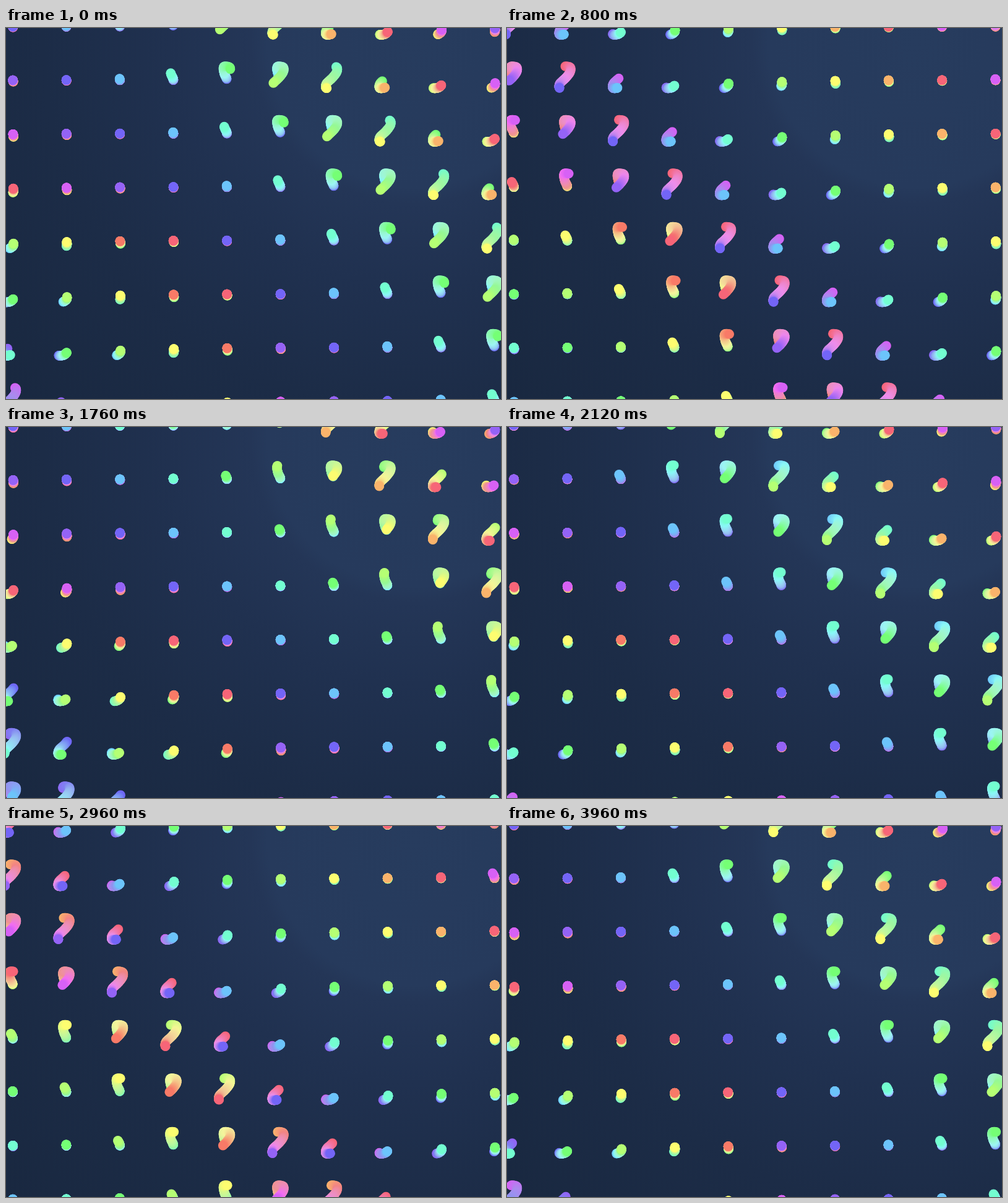
Write an HTML page with a canvas that moves like this. It is 800 px wide and 600 px high and loops after 4 s.

```html
<!DOCTYPE html>
<html lang="en">
<head>
<meta charset="utf-8">
<title>Dot wave</title>
<style>
html, body { margin: 0; width: 100%; height: 100%; overflow: hidden; background: #1a2940; }
canvas { display: block; }
</style>
</head>
<body>
<canvas id="stage" width="800" height="600"></canvas>
<script>
const ctx = document.getElementById('stage').getContext('2d');

const STEP_MS = 40, PERIOD = 50, STAGGER = PERIOD / 12, TRAIL = 9, COPIES = 44;
const COLS = 10, ROWS = 8, GAP = 86.5, LEFT = 11, TOP = -2.5, RADIUS = 7.7;

// Key points of one dot's loop around its rest place: [step, x, y]
const PATH = [
  [0, 0, 0], [5.5, -1, -3.5], [8.3, -4.3, -11], [10.7, -4.8, -21.5],
  [12, 4.5, -20.5], [13, 5, -14], [14.8, -1.5, -4.5], [16.7, -11.5, 5.2],
  [19, -13.2, 11.8], [21.5, -10.5, 13.5], [25, -4, 12.3], [29, .5, 8.6],
  [36, .8, 3.2], [44, .1, .6]
];

const HUES = [246, 203, 160, 120, 92, 60, 30, -8, -72, -100];
const BLOCK_HUES = HUES.map(hue => hue === 30 ? 8 : hue);

const mod = (n, m) => ((n % m) + m) % m;
const mix = (a, b, u) => a + (b - a) * u;

function knot(i) {
  const [step, x, y] = PATH[mod(i, PATH.length)];
  return [step + PERIOD * Math.floor(i / PATH.length), x, y];
}

// Smooth curve through the key points
function place(step) {
  const s = mod(step, PERIOD);
  let i = PATH.length - 1;
  while (PATH[i][0] > s) i--;
  const [a, b, c, d] = [i - 1, i, i + 1, i + 2].map(knot);
  const span = c[0] - b[0], u = (s - b[0]) / span;
  const u2 = u * u, u3 = u2 * u;
  return [1, 2].map(k => {
    const m0 = (c[k] - a[k]) / (c[0] - a[0]) * span;
    const m1 = (d[k] - b[k]) / (d[0] - b[0]) * span;
    return (2 * u3 - 3 * u2 + 1) * b[k] + (u3 - 2 * u2 + u) * m0
         + (3 * u2 - 2 * u3) * c[k] + (u3 - u2) * m1;
  });
}

// Colours from three hues back up to the head, paler half way
function ramp(hues, index) {
  const hueAt = i => hues[mod(i, hues.length)] - 360 * Math.floor(i / hues.length);
  return Array.from({ length: COPIES }, (_, i) => {
    const u = i / (COPIES - 1);
    const hue = mod(mix(hueAt(index - 3), hueAt(index), u), 360);
    const pale = Math.sin(Math.PI * u);
    const green = Math.cos((hue - 120) * Math.PI / 180);
    const sat = 94 + 6 * green - 16 * pale;
    const light = 70 + 3 * green + 7 * pale;
    return `hsl(${hue.toFixed(1)}, ${sat.toFixed(1)}%, ${light.toFixed(1)}%)`;
  });
}

function makeCell(col, row) {
  const diagonal = col - row;
  const inBlock = row >= 4 && col <= 4 && diagonal < 0;
  return {
    x: LEFT + GAP * col,
    y: TOP + GAP * row,
    delay: STAGGER * diagonal,
    colours: inBlock ? ramp(BLOCK_HUES, diagonal + 8) : ramp(HUES, diagonal)
  };
}

const cells = Array.from({ length: COLS * ROWS },
  (_, i) => makeCell(i % COLS, Math.floor(i / COLS)));

const backdrop = ctx.createRadialGradient(660, 20, 0, 660, 20, 880);
[[0, '#273c5e'], [.27, '#263a5c'], [.3, '#243657'], [.45, '#203150'],
 [.68, '#1c2c47'], [1, '#192840']].forEach(stop => backdrop.addColorStop(...stop));

function draw(step) {
  ctx.fillStyle = backdrop;
  ctx.fillRect(0, 0, 800, 600);
  for (const cell of cells) {
    cell.colours.forEach((colour, i) => {
      const back = TRAIL * (1 - i / (COPIES - 1));
      const [x, y] = place(step + cell.delay - back);
      ctx.fillStyle = colour;
      ctx.beginPath();
      ctx.arc(cell.x + x, cell.y + y, RADIUS, 0, 2 * Math.PI);
      ctx.fill();
    });
  }
}

const start = performance.now();
let shown = -1;
function tick() {
  const step = Math.floor((performance.now() - start) / STEP_MS) % PERIOD;
  if (step !== shown) draw(shown = step);
  requestAnimationFrame(tick);
}
tick();
</script>
</body>
</html>
```
